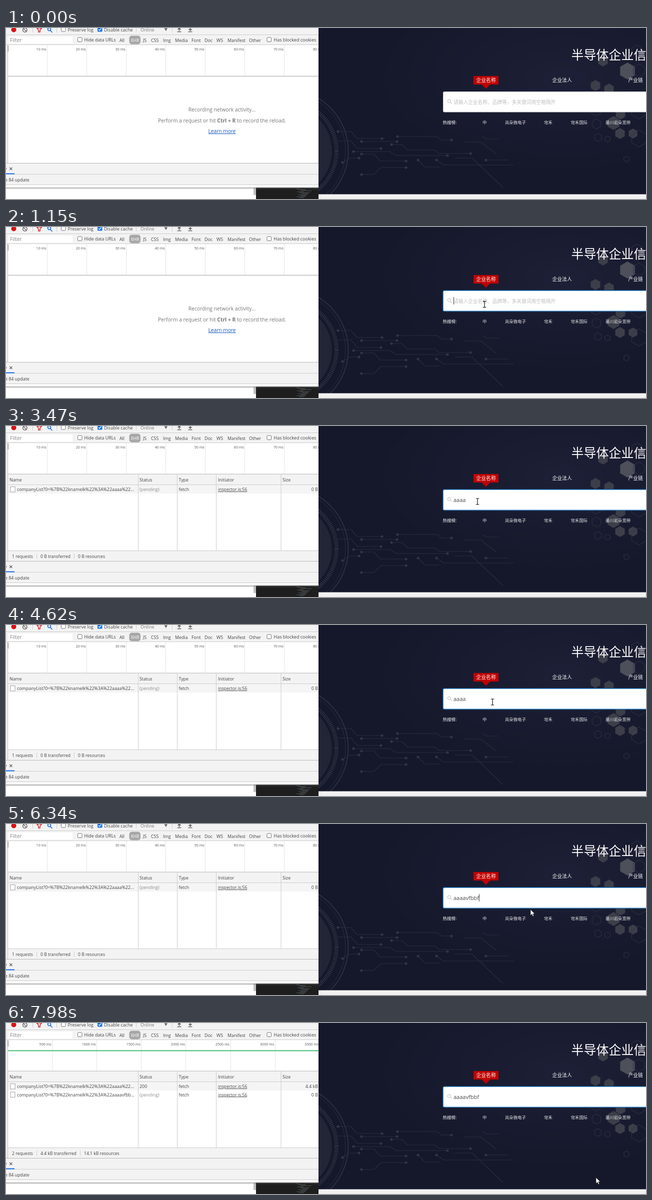
Animation, 1280 px wide and 342 px high, one loop 8 s. Source, as an HTML page:

```html
<!DOCTYPE html>
<html lang="zh-CN">
<head>
<meta charset="utf-8">
<title>Search requests</title>
<style>
  html, body { margin: 0; width: 100%; height: 100%; overflow: hidden; background: #fff; }
  svg { display: block; width: 100%; height: 100%; font-family: "Open Sans", "Noto Sans", sans-serif; }
  text { white-space: pre; }
  .cjk { font-family: "Noto Sans CJK SC", "Noto Sans CJK", sans-serif; }
</style>
</head>
<body>
<svg id="stage" viewBox="0 0 1280 342" xmlns="http://www.w3.org/2000/svg"></svg>
<script>
const LOOP = 8000, SPLIT = 625;
const INK = '#444', BAR = '#f3f3f3', RULE = '#cccccc';

// Markup helpers
const rect = (x, y, w, h, fill, more = '') =>
  `<rect x="${x}" y="${y}" width="${w}" height="${h}" fill="${fill}" ${more}/>`;
const path = (d, stroke, w = 1, more = '') =>
  `<path d="${d}" fill="none" stroke="${stroke}" stroke-width="${w}" ${more}/>`;
const circle = (x, y, r, fill, more = '') =>
  `<circle cx="${x}" cy="${y}" r="${r}" fill="${fill}" ${more}/>`;
const text = (x, y, size, str, fill = INK, more = '') =>
  `<text x="${x}" y="${y}" font-size="${size}" fill="${fill}" ${more}>${str}</text>`;
const cjk = (x, y, size, str, fill = '#fff', more = '') =>
  text(x, y, size, str, fill, `class="cjk" ${more}`);
const group = (id, body) => `<g id="${id}">${body}</g>`;
const vline = (x, y, h, color = RULE) => rect(x, y, 1, h, color);
const hline = (y, color = RULE, h = 1) => rect(0, y, SPLIT, h, color);
const END = 'text-anchor="end"', MID = 'text-anchor="middle"';

const checkbox = (x, y, on) => on
  ? rect(x, y, 9.5, 9.5, '#1a73e8', 'rx="1.5"') + path(`M${x + 2} ${y + 5}l2 2 3.6-4.4`, '#fff', 1.4)
  : rect(x + .5, y + .5, 8.5, 8.5, '#fff', 'rx="1.5" stroke="#767676"');

function toolbar() {
  const kinds = [[227, 'All'], [274, 'JS'], [290, 'CSS'], [314, 'Img'], [338, 'Media'], [371, 'Font'],
    [397, 'Doc'], [421, 'WS'], [443, 'Manifest'], [486, 'Other']];
  return rect(0, 0, SPLIT, 33, BAR) + hline(13) + hline(33) +
    circle(15.5, 3.5, 5, '#dd1111') +
    path('M33.5 4a4.3 4.3 0 1 0 8.6 0a4.3 4.3 0 1 0-8.6 0M34.8 1l6 6', '#6e6e6e', 1.5) +
    vline(53, 0, 9) +
    path('M61.5 0L65 4V8H68V4L71.5 0Z', '#d81e1e', 1.5) +
    path('M83.5 2.5a3 3 0 1 0 6 0a3 3 0 1 0-6 0M88.6 5l4 4', '#1a73e8', 1.7) +
    vline(101, 0, 9) +
    checkbox(110, -2) + text(123.5, 7, 9, 'Preserve log') +
    checkbox(183, -2, true) + text(196, 7, 9, 'Disable cache') +
    vline(260, 0, 9) + text(269, 7, 9, 'Online', '#777') +
    '<path d="M316.5 .5h6.5l-3.2 5.5z" fill="#666"/>' + vline(332, 0, 9) +
    path('M346.5 6V0M342.5 7.5h8', '#666', 1.6) + '<path d="M342.5 3l4-4 4 4z" fill="#666"/>' +
    path('M368.5-1V3M364.5 7.5h8', '#666', 1.6) + '<path d="M364.5 2l4 4 4-4z" fill="#666"/>' +
    rect(5, 17, 128, 14, '#fff') + text(8, 28, 10, 'Filter', '#858585') +
    checkbox(143, 18.5) + text(156.5, 27, 8.9, 'Hide data URLs') +
    rect(246.5, 15.5, 22.5, 17, '#a6a6a6', 'rx="5"') + text(258, 27.5, 8.9, 'XHR', '#fff', MID) +
    kinds.map(([x, s]) => text(x, 27.5, 8.9, s)).join('') +
    checkbox(521.5, 18.5) + text(535.5, 27, 9, 'Has blocked cookies');
}

function scale(id, gap, unit) {
  let s = '';
  for (let i = 1; i <= 8; i++) {
    const x = 3 + gap * i;
    s += vline(Math.round(x), 34, 62, '#e3e3e3') + text(x - 1.5, 45, 7.1, i * unit + ' ms', '#555', END);
  }
  return group(id, s);
}

function row(y, name, body) {
  return rect(9, y - 8.5, 9, 10.5, '#fff', 'stroke="#a0a0a0"') +
    text(22, y, 8.9, name) + text(345.5, y, 8.9, 'fetch') +
    text(424, y, 8.65, 'inspector.js:56', INK, 'text-decoration="underline"') + body;
}
const pending = y => text(267, y, 9, '(pending)', '#8c8c8c') + text(624, y, 8.9, '0 B', INK, END);

function table() {
  const heads = [[7, 'Name'], [267, 'Status'], [345.5, 'Type'], [424, 'Initiator'], [553, 'Size']];
  const url = 'companyList?0=%7B%22knamelk%22%3A%22aaaa';
  const foot = (id, a, b, c, x) => group(id,
    text(12, 264, 8.6, a) + text(69, 264, 8.6, b) + text(x, 264, 8.6, c) +
    vline(61, 255, 11) + vline(x - 8, 255, 11));
  return rect(4, 97, 621, 20, BAR) + rect(4, 117, 621, 1, RULE) + rect(4, 118, 621, 17, '#f5f5f5') +
    [264, 342, 420, 549.5].map(x => vline(x, 97, 152)).join('') +
    heads.map(([x, s]) => text(x, 110.5, 8.8, s)).join('') +
    row(130, url + '%22…', '') + group('wait', pending(130)) +
    group('done', text(267, 130, 8.9, '200') + text(624, 130, 8.9, '4.4 kB', INK, END)) +
    group('second', row(146.5, url + 'vfbb…', pending(146.5))) +
    rect(4, 249, 621, 21, BAR) + rect(4, 249, 621, 1, RULE) +
    foot('foot1', '1 requests', '0 B transferred', '0 B resources', 144) +
    foot('foot2', '2 requests', '0 B transferred', '0 B resources', 144) +
    foot('foot3', '2 requests', '4.4 kB transferred', '14.1 kB resources', 156);
}

function devtools() {
  const grey = '#757575';
  return rect(0, 0, SPLIT, 319, '#fff') + toolbar() +
    scale('scale1', 79.05, 10) + scale('scale2', 111.3, 500) + scale('scale3', 89.1, 500) +
    group('green', rect(4, 54.5, 621, 1.8, '#32b866')) +
    hline(95.5, RULE, 2) +
    group('empty',
      text(432, 166.5, 10.3, 'Recording network activity…', grey, MID) +
      text(432, 188.5, 10.3, 'Perform a request or hit <tspan font-weight="700">Ctrl + R</tspan> to record the reload.', grey, MID) +
      text(432, 210, 10.2, 'Learn more', '#1558c0', MID + ' text-decoration="underline"')) +
    group('list', table()) +
    rect(0, 34, 3, 236, BAR) + vline(3, 34, 236, '#bdbdbd') + rect(3, 35, 2, 12, '#a5a5a5') +
    rect(0, 270, SPLIT, 43, BAR) + hline(270, '#b8b8b8') + hline(292) +
    text(-3, 285, 9, 'v') + path('M7.2 279l5.2 5.2M12.4 279l-5.2 5.2', '#555', 1.2) +
    rect(0, 290.5, 17, 2, '#1a73e8') +
    text(-2, 307, 8.8, 'e 84 update') + hline(313);
}

function below() {
  let s = rect(0, 319, SPLIT, 23, '#fff') + rect(495, 319, 5, 15, '#c1c1c1') + rect(500, 319, 125, 23, '#1e1e1e');
  for (let i = 0; i < 10; i++)
    s += rect(580 + (i * 5) % 13, 321 + i * 2, 7 + (i * 7) % 15, 1, ['#46525f', '#5a5a54', '#4a5555'][i % 3]);
  return s + rect(0, 319, SPLIT, 4, 'url(#drop)');
}

const hex = (x, y, r, fill, stroke = 'none') => {
  const pts = [...Array(6)].map((_, i) => {
    const a = (i + .5) * Math.PI / 3;
    return (x + r * Math.cos(a)).toFixed(1) + ',' + (y + r * Math.sin(a)).toFixed(1);
  });
  return `<polygon points="${pts.join(' ')}" fill="${fill}" stroke="${stroke}"/>`;
};

function backdrop() {
  const line = '#2b2e3e';
  const wires = ['M664 207h26l12 14h50', 'M662 226h28l13 15h47', 'M711 227h71', 'M783 217h79l9 7h20',
    'M771 233h21l11 11h55l8 7h63', 'M695 247h73l12 8h103', 'M711 252h25l12 14h52',
    'M673 269l15-9h18', 'M711 293h25l14-14h50', 'M824 264l14 14h30', 'M861 264l14 10h140',
    'M960 264h45', 'M898 260h34l62 59', 'M915 228h35l30 24', 'M985 222h-24l-8-5'];
  const dots = ['664 207', '752 221', '750 241', '711 227', '782 227', '783 217', '891 224', '771 233',
    '929 251', '695 247', '883 255', '711 252', '800 266', '673 269', '706 260', '711 293',
    '800 279', '824 264', '861 264', '960 264'];
  const solid = [[1243, 86, 17], [1194, 66, 11], [1179, 115, 11], [1206, 122, 11], [1215, 190, 14],
    [1228, 211, 11], [1229, 172, 11], [1254, 211, 10]];
  const open = [[1266, 85, 13], [1180, 166, 10], [1181, 192, 10], [1266, 165, 17], [1266, 221, 17],
    [1184, 219, 8], [1203, 222, 6], [1241, 262, 6], [1262, 46, 12]];
  return rect(SPLIT, 0, 655, 333, '#15172a') + rect(SPLIT, 0, 655, 333, 'url(#glow)') +
    circle(562, 246, 90, '#222536') +
    circle(562, 246, 99, 'none', 'stroke="#323545" stroke-width="8" stroke-dasharray="1.6 2"') +
    circle(562, 246, 117, 'none', `stroke="${line}"`) +
    circle(562, 246, 122.5, 'none', 'stroke="#2c2f40" stroke-width="2"') +
    wires.map(d => path(d, line, 1.2)).join('') +
    dots.map(p => circle(...p.split(' '), 2.6, '#323547')).join('') +
    solid.map(([x, y, r]) => hex(x, y, r, r > 15 ? '#4d4f5a' : '#3c3e49')).join('') +
    open.map(([x, y, r]) => hex(x, y, r, 'none', '#323543')).join('');
}

function site() {
  const hot = [[953, '中'], [998, '岚朵微电子'], [1076, '穹禾'], [1129.5, '穹禾国际'], [1199, '墨川岩朵宽带']];
  return `<g clip-path="url(#right)">` + backdrop() +
    cjk(1130.5, 62.5, 25, '半导体企业信息') +
    rect(935, 96, 50, 17, '#c00000') + '<path d="M951.5 113h17l-8.5 8.5z" fill="#c00000"/>' +
    cjk(940.5, 107.8, 9.8, '企业名称') + cjk(1092.5, 107.8, 9.8, '企业法人') + cjk(1244.5, 107.8, 9.8, '产业链') +
    rect(873.5, 126.5, 420, 42.5, 'none', 'id="focus" rx="3" stroke="#154a80"') +
    rect(874.5, 127.5, 420, 40.5, '#fff', 'id="box" rx="2" stroke="#d9d9d9"') +
    path('M883.3 146.3a3.1 3.1 0 1 0 6.2 0a3.1 3.1 0 1 0-6.2 0M888.7 148.7l2.8 3', '#b5b5b5', 1) +
    cjk(895, 152, 9.72, '请输入企业名称、品牌等，多关键词用空格隔开', '#bfbfbf', 'id="hint"') +
    text(895, 152, 11, '', '#484848', 'id="typed"') + rect(0, 140, 1, 15, '#444', 'id="caret"') +
    cjk(873.5, 191.5, 8.5, '热搜榜:', '#fff', 'font-weight="500"') +
    hot.map(([x, s]) => cjk(x, 191.5, 8.4, s, '#e6e6e8')).join('') +
    '</g>' + rect(SPLIT, 332.5, 655, 10, '#f1f1f1');
}

const defs = `<defs>
  <linearGradient id="drop" x2="0" y2="1"><stop stop-color="#666" stop-opacity=".8"/><stop offset=".4" stop-color="#777" stop-opacity=".3"/><stop offset="1" stop-color="#777" stop-opacity="0"/></linearGradient>
  <radialGradient id="glow" cx=".75" cy=".3" r=".6"><stop stop-color="#1d2036"/><stop offset="1" stop-color="#1d2036" stop-opacity="0"/></radialGradient>
  <clipPath id="left"><rect width="${SPLIT}" height="342"/></clipPath>
  <clipPath id="right"><rect x="${SPLIT}" width="655" height="333"/></clipPath></defs>`;

const stage = document.getElementById('stage');
stage.innerHTML = defs + site() + `<g clip-path="url(#left)">${below()}${devtools()}</g>` +
  group('mouse',
    group('beam', path('M-3.2-6H-1Q0-6 0-5V5Q0 6-1 6H-3.2M3.2-6H1Q0-6 0-5M0 5Q0 6 1 6H3.2', '#111', 1.2)) +
    group('arrow', '<path d="M0 0V12l2.8-2.6 1.9 4.3 2-.9-1.9-4.1H8.6Z" fill="#fff" stroke="#222" stroke-width=".7"/>'));

const ui = {};
stage.querySelectorAll('[id]').forEach(e => ui[e.id] = e);

// Timelines
const TYPING = [[0, ''], [1460, 'a'], [1600, 'aa'], [1770, 'aaa'], [2000, 'aaaa'], [4720, 'aaaav'],
  [4790, 'aaaavf'], [4940, 'aaaavfb'], [5170, 'aaaavfbb'], [5250, 'aaaavfbbf']];
const CARET = [[1080, 2540], [3000, 3470], [4010, 4500], [4720, 5720], [6340, 6800], [7350, 7850]];
const MOUSE = [[150, 1277, 302], [310, 1215, 262], [470, 1105, 212], [620, 1000, 176], [770, 959, 161],
  [930, 957, 155], [1460, 957, 154], [1600, 944, 152], [1770, 943, 151], [4010, 943, 151],
  [4560, 973, 154], [5170, 973, 154], [5250, 974, 155], [5420, 974, 155], [5650, 974, 155],
  [5800, 975, 157], [6030, 980, 159], [6190, 1049, 171], [6650, 1049, 171], [6880, 1060, 152],
  [7030, 1061, 150], [7430, 1061, 150], [7900, 1180, 309], [8000, 1180, 309]];
const LIST = 3470, SECOND = 6650, RESCALE = 6880, DONE = 7650;

function mouseAt(t) {
  const i = MOUSE.findIndex(m => m[0] > t);
  if (i < 1) return MOUSE[i ? MOUSE.length - 1 : 0].slice(1);
  const [t0, x0, y0] = MOUSE[i - 1], [t1, x1, y1] = MOUSE[i];
  const k = (t - t0) / (t1 - t0);
  return [x0 + (x1 - x0) * k, y0 + (y1 - y0) * k];
}

const show = (id, on) => ui[id].style.display = on ? '' : 'none';

function draw(t) {
  const typed = TYPING.filter(s => s[0] <= t).pop()[1];
  if (ui.typed.textContent !== typed) ui.typed.textContent = typed;
  show('hint', !typed);
  show('caret', CARET.some(([a, b]) => t >= a && t < b));
  ui.caret.setAttribute('x', 895 + (typed ? ui.typed.getComputedTextLength() : 0));

  ui.box.setAttribute('stroke', t < 690 ? '#d9d9d9' : '#4a9fe0');
  ui.focus.style.opacity = Math.min(1, Math.max(0, (t - 940) / 210));

  show('empty', t < LIST);
  show('list', t >= LIST);
  show('second', t >= SECOND);
  show('foot1', t < SECOND);
  show('foot2', t >= SECOND && t < DONE);
  show('foot3', t >= DONE);
  show('wait', t < DONE);
  show('done', t >= DONE);
  show('green', t >= DONE);
  show('scale1', t < RESCALE);
  show('scale2', t >= RESCALE && t < DONE);
  show('scale3', t >= DONE);

  const [x, y] = mouseAt(t), inside = y > 127 && y < 168;
  show('mouse', t >= 150);
  show('beam', inside);
  show('arrow', !inside);
  ui.mouse.setAttribute('transform', `translate(${x.toFixed(1)} ${y.toFixed(1)})`);
}

const start = performance.now();
function tick() {
  draw((performance.now() - start) % LOOP);
  requestAnimationFrame(tick);
}
tick();
</script>
</body>
</html>
```
